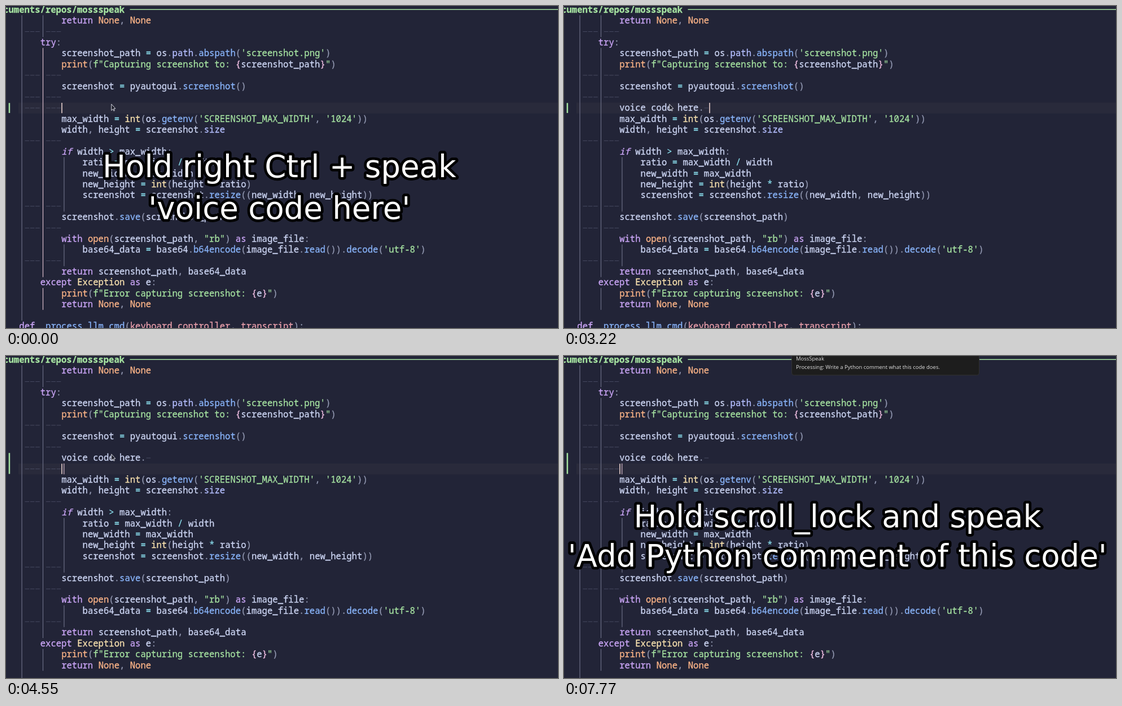
An HTML page with a canvas that plays this animation: 978 by 572 pixels, repeating every 8000 ms.

```html
<!DOCTYPE html>
<html lang="en">
<head>
<meta charset="utf-8">
<style>
html, body { margin: 0; width: 100%; height: 100%; overflow: hidden; background: #222437; }
canvas { display: block; }
</style>
</head>
<body>
<canvas id="stage" width="978" height="572"></canvas>
<script>
const ctx = document.getElementById('stage').getContext('2d');
const LOOP = 8000, CW = 9.355, LH = 19.385, LEFT = 23.3, TOP = 16.4;
const MONO = '15.59px "Noto Sans Mono", "DejaVu Sans Mono", monospace';
const C = {
  bg: '#222437', line: '#292a3b', text: '#cdd6f4', key: '#cba6f7', str: '#a6e3a1',
  builtin: '#fab387', type: '#f9e2af', fn: '#89b4fa', prop: '#b4befe', op: '#89dceb',
  punct: '#9399b2', brace: '#f5c2e7', param: '#eba0ac', dash: '#464960',
  guide: '#6b6e86', active: '#d9bccb', cursor: '#f4dbd6'
};

const CODE = `
        return None, None

    try:
        screenshot_path = os.path.abspath('screenshot.png')
        print(f"Capturing screenshot to: {screenshot_path}")

        screenshot = pyautogui.screenshot()


        max_width = int(os.getenv('SCREENSHOT_MAX_WIDTH', '1024'))
        width, height = screenshot.size

        if width > max_width:
            ratio = max_width / width
            new_width = max_width
            new_height = int(height * ratio)
            screenshot = screenshot.resize((new_width, new_height))

        screenshot.save(screenshot_path)

        with open(screenshot_path, "rb") as image_file:
            base64_data = base64.b64encode(image_file.read()).decode('utf-8')

        return screenshot_path, base64_data
    except Exception as e:
        print(f"Error capturing screenshot: {e}")
        return None, None

def _process_llm_cmd(keyboard_controller, transcript):`.slice(1).split('\n');

const EDIT = 8;        // row being edited
const LAST_BLANK = 27; // blank row without indent marks
const GUIDES = [[0, 0, 27], [4, 0, 1], [4, 3, 23], [4, 25, 26], [8, 13, 17], [8, 21, 22]];

const CAPTIONS = [
  { from: 0, to: 2100, lines: [['Hold right Ctrl + speak', 304], ["'voice code here'", 378]] },
  { from: 3430, to: 4550, lines: [['Spoken text was written', 299]] },
  { from: 6300, to: LOOP, lines: [['Hold scroll_lock and speak', 304], ["'Add Python comment of this code'", 374]] }
];

const colX = c => LEFT + c * CW;
const rowY = r => TOP + r * LH;

function rect(x, y, w, h, color) {
  ctx.fillStyle = color;
  ctx.fillRect(x, y, w, h);
}

// Code text, with a hairline stroke for a medium weight.
function codeText(text, x, y, color, style) {
  ctx.font = style + ' ' + MONO;
  ctx.fillStyle = ctx.strokeStyle = color;
  ctx.lineWidth = 0.3;
  ctx.fillText(text, x, y);
  ctx.strokeText(text, x, y);
}

function wordColor(word, before, after) {
  if (/^(return|try|except|as|with|if|def)$/.test(word)) return C.key;
  if (/^(None|print|open)$/.test(word)) return C.builtin;
  if (/^(int|Exception)$/.test(word)) return C.type;
  if (/^(keyboard_controller|transcript)$/.test(word)) return C.param;
  if (after === '(') return C.fn;
  if (before === '.') return C.prop;
  return C.text;
}

// Splits a line into [column, text, colour] runs.
function tokenize(line) {
  const runs = [];
  for (const m of line.matchAll(/f?"[^"]*"|'[^']*'|\w+|[^\s\w]/g)) {
    const s = m[0], i = m.index;
    if (/["']/.test(s)) {
      for (const p of s.matchAll(/[{}]|[^{}]+/g)) {
        const inside = s[p.index - 1] === '{';
        runs.push([i + p.index, p[0], /[{}]/.test(p[0]) ? C.brace : inside ? C.text : C.str]);
      }
    } else if (/\w/.test(s)) {
      runs.push([i, s, wordColor(s, line[i - 1], line[i + s.length])]);
    } else {
      runs.push([i, s, /[=><*\/]/.test(s) ? C.op : C.punct]);
    }
  }
  return runs;
}

function dashes(row, from, count) {
  for (let i = 0; i < count; i++)
    rect(colX(from + i) + 0.8, rowY(row) + LH / 2 - 0.5, CW - 1.7, 1, C.dash);
}

function drawEditor(typed, newline) {
  const lines = CODE.slice();
  if (typed) lines[EDIT] = ' '.repeat(8) + 'voice code here.';
  if (newline) lines.splice(EDIT + 1, 0, '');
  const shift = r => newline && r > EDIT ? r + 1 : r;
  const current = newline ? EDIT + 1 : EDIT;

  rect(22, rowY(current), 956, LH, C.line);
  lines.forEach((line, r) => {
    if (!line && r !== shift(LAST_BLANK)) {
      dashes(r, 1, 3);
      dashes(r, 5, 3);
    }
    for (const [col, text, color] of tokenize(line))
      codeText(text, colX(col), rowY(r) + 14.8, color, text === 'if' ? 'italic 500' : '500');
  });
  if (typed) dashes(EDIT, 24, 1);

  for (const [col, a, b] of GUIDES) {
    const y = rowY(shift(a)), active = !typed && col === 4 && a > 0;
    rect(colX(col) + 4.2, y, 1.2, rowY(shift(b) + 1) - y, active ? C.active : C.guide);
  }
  if (newline) rect(colX(8) + 4, rowY(current), 1.2, LH, C.active);

  const cursorCol = typed && !newline ? 25 : 8;
  rect(colX(cursorCol) + 0.1, rowY(current) + 0.5, 1.5, LH - 1, C.cursor);
  rect(4.7, rowY(EDIT) + 0.8, 2.5, (newline ? 2 : 1) * LH - 1.6, C.str);
}

function drawHeader() {
  codeText('cuments/repos/mossspeak', 210.3 - 23 * CW, 11.8, C.str, 'bold');
  rect(219.5, 5.5, 759, 1.5, C.str);
}

function drawPointer() {
  const p = new Path2D('M186.8 174.3 V185.6 L189.4 183.2 L191 186.5 L192.4 185.8 L190.9 182.6 L193.8 182.2 Z');
  ctx.fillStyle = '#1b1c28';
  ctx.strokeStyle = '#d8d9e2';
  ctx.lineWidth = 1;
  ctx.lineJoin = 'miter';
  ctx.fill(p);
  ctx.stroke(p);
}

function drawCaption(lines) {
  ctx.font = '54.6px "DejaVu Sans", sans-serif';
  ctx.textAlign = 'center';
  ctx.lineJoin = 'round';
  ctx.lineWidth = 9.5;
  ctx.strokeStyle = '#000';
  ctx.fillStyle = '#fff';
  for (const [text, y] of lines) ctx.strokeText(text, 484.3, y);
  for (const [text, y] of lines) ctx.fillText(text, 484.3, y);
  ctx.textAlign = 'left';
}

function drawNotice() {
  ctx.beginPath();
  ctx.roundRect(403.5, -10, 332, 44, 4);
  ctx.fillStyle = '#1d1d1d';
  ctx.strokeStyle = '#303030';
  ctx.lineWidth = 1;
  ctx.fill();
  ctx.stroke();
  ctx.fillStyle = '#e0e0e0';
  ctx.font = '9.48px "Open Sans", "Noto Sans", sans-serif';
  ctx.fillText('MossSpeak', 411, 8.3);
  ctx.fillText('Processing: Write a Python comment what this code does.', 411, 22.8);
}

function draw(t) {
  rect(0, 0, 978, 572, C.bg);
  drawEditor(t >= 2380, t >= 3360);
  drawHeader();
  drawPointer();
  for (const c of CAPTIONS) if (t >= c.from && t < c.to) drawCaption(c.lines);
  if (t >= 7770) drawNotice();
}

const start = performance.now();
function tick() {
  draw((performance.now() - start) % LOOP);
  requestAnimationFrame(tick);
}
tick();
</script>
</body>
</html>
```
